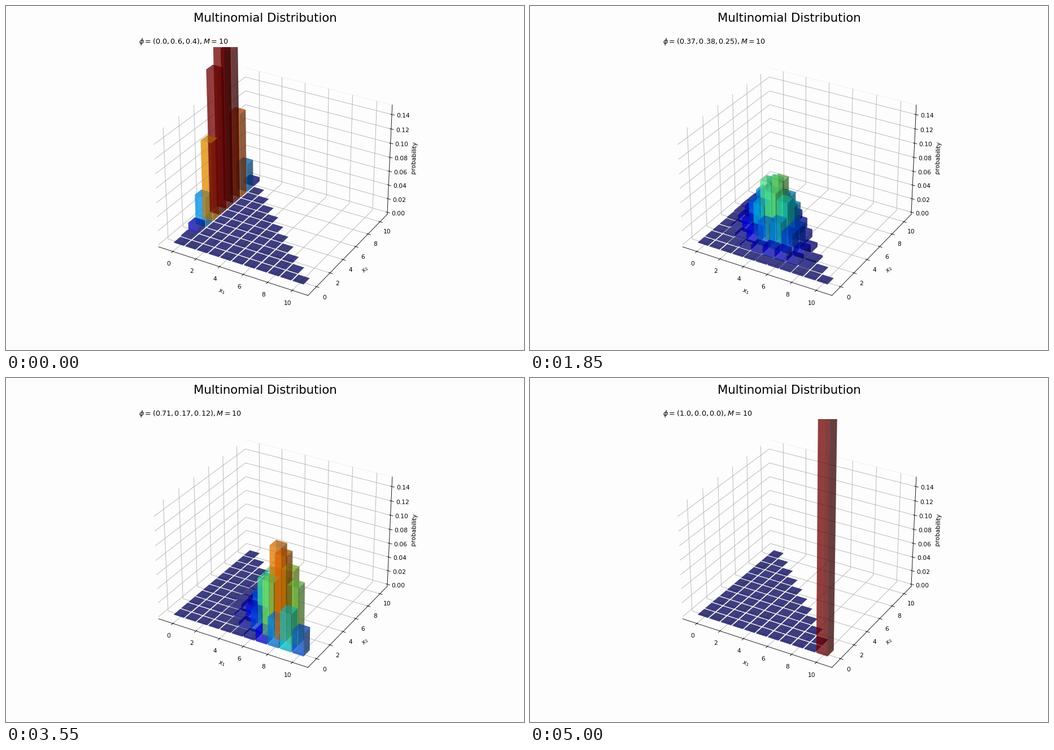
A matplotlib script that plays this animation: 917x611 px, repeating every 5050 ms.

```python
import math

import numpy as np
import matplotlib.pyplot as plt
from matplotlib.animation import FuncAnimation

W, H = 917, 611
DPI = W / 12
FRAMES, INTERVAL = 101, 50
M = 10
BAR = 0.9
P_MAX = 0.15
PAPER = "#fdfdfd"

# All count pairs (x1, x2); the third count is what remains of M.
x1, x2 = np.array([(a, b) for b in range(M + 1) for a in range(M + 1 - b)]).T
x3 = M - x1 - x2
coef = np.array([
    math.factorial(M) / (math.factorial(a) * math.factorial(b) * math.factorial(c))
    for a, b, c in zip(x1, x2, x3)
])


def widen(lo, hi, share):
    pad = (hi - lo) * share
    return lo - pad, hi + pad


fig = plt.figure(figsize=((W + 1e-6) / DPI, (H + 1e-6) / DPI), dpi=DPI, facecolor=PAPER)
fig.suptitle("Multinomial Distribution", fontsize=20)
ax = fig.add_subplot(projection="3d", facecolor=PAPER)

side = widen(*widen(-BAR / 2, M + BAR / 2, 0.05), 1 / 48)
ax.set_xlim(*side)
ax.set_ylim(*side)
ax.set_zlim(*widen(0, P_MAX, 1 / 48))
ax.set_xticks(range(0, M + 1, 2))
ax.set_yticks(range(0, M + 1, 2))
ax.set_zticks(np.arange(8) * 0.02)
ax.set_xlabel("$x_1$")
ax.set_ylabel("$x_2$")
ax.set_zlabel("probability")
for axis in (ax.xaxis, ax.yaxis, ax.zaxis):
    axis.set_pane_color(PAPER)
ax.yaxis.pane.set_edgecolor("#f1f1f1")

bars = None


def update(i):
    global bars
    if bars is not None:
        bars.remove()
    p = i / (FRAMES - 1)
    phi = np.array([p, (1 - p) * 0.6, (1 - p) * 0.4])
    prob = coef * phi[0] ** x1 * phi[1] ** x2 * phi[2] ** x3
    bars = ax.bar3d(
        x1 - BAR / 2, x2 - BAR / 2, np.zeros(len(prob)), BAR, BAR, prob,
        color=plt.cm.jet(prob / P_MAX), alpha=0.5, shade=True,
    )
    values = ", ".join(str(round(float(v), 2)) for v in phi)
    ax.set_title(rf"$\phi=({values}), M={M}$", loc="left", y=1.0)
    return [bars]


anim = FuncAnimation(fig, update, frames=FRAMES, interval=INTERVAL,
                     repeat=True, repeat_delay=0, blit=False)
plt.show()
```
